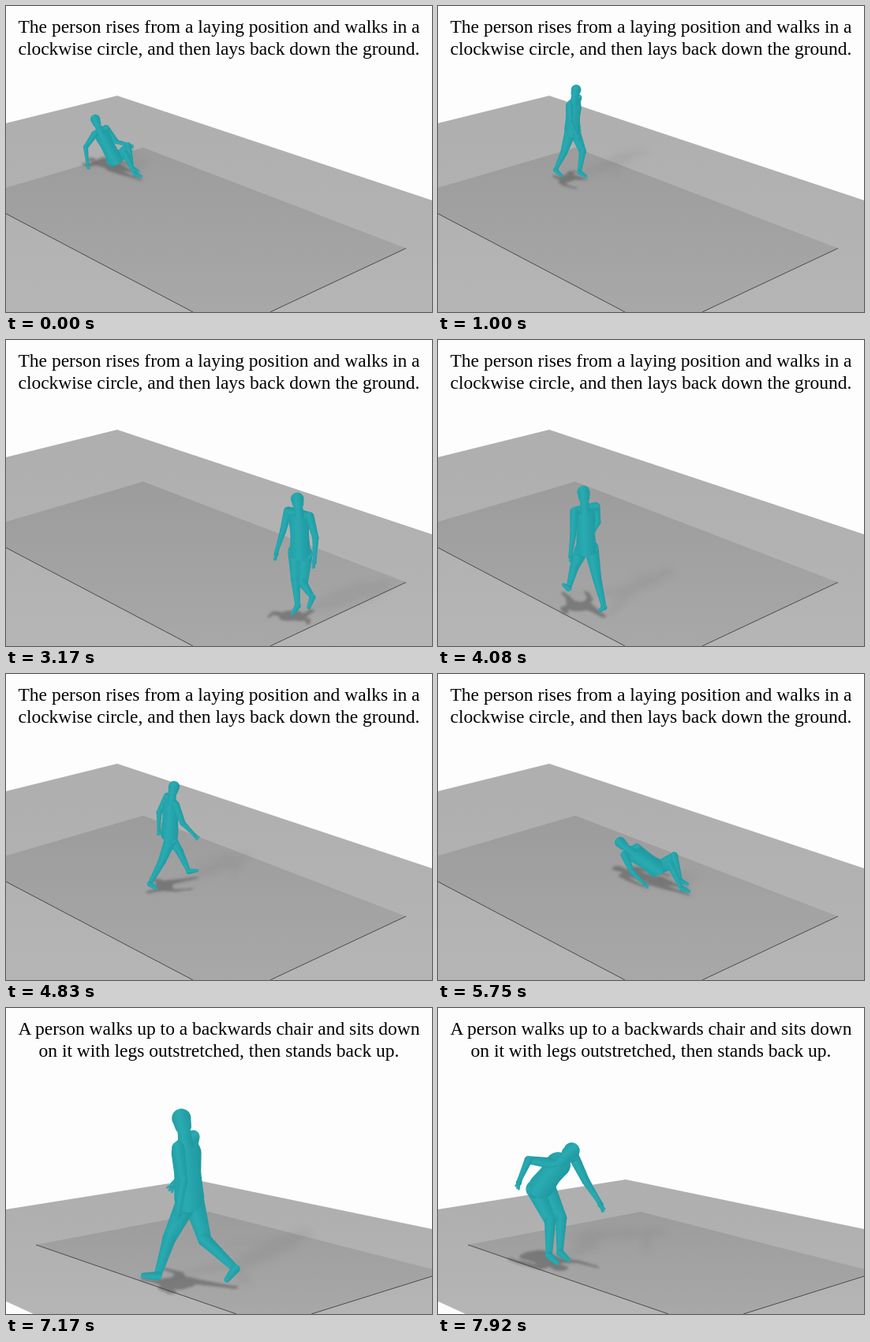
Recreate the animation shown at these times as an HTML page with a canvas. Size 540x389 px, loop 8000 ms.

```html
<!DOCTYPE html>
<html lang="en">
<head>
<meta charset="utf-8">
<title>Walking figure</title>
<style>
  html, body { margin: 0; width: 100%; height: 100%; overflow: hidden; background: #fdfdfd; }
  canvas { position: absolute; left: 0; top: 0; }
  #caption {
    position: absolute; left: 0; top: 12px; width: 540px;
    font: 23.5px/28px "Liberation Serif", "Times New Roman", serif;
    color: #000; text-align: center; white-space: pre;
  }
</style>
</head>
<body>
<canvas id="stage" width="540" height="389"></canvas>
<div id="caption"></div>
<script>
const ctx = document.getElementById('stage').getContext('2d');
const caption = document.getElementById('caption');
const LOOP = 8000, FPS = 12, CUT = 6000;
const STRIDE = 750, STEP_AT = 1833; // two steps; left foot furthest forward
const RAD = Math.PI / 180;

const mix = (a, b, u) => a + (b - a) * u;
const clamp = u => Math.min(1, Math.max(0, u));
const smooth = u => { u = clamp(u); return u * u * (3 - 2 * u); };
const segment = (rows, t) => Math.max(1, rows.findIndex(r => r[0] > t));

// Poses in degrees: lean, then [left, right] thighs, knees, arms, elbows.
const pose = (lean, thighs, knees, arms, elbows) => [lean, ...thighs, ...knees, ...arms, ...elbows];
const SIT = pose(-40, [140, 125], [125, 87], [40, -30], [50, 45]);
const LIE = pose(-80, [130, 115], [110, 80], [65, 60], [15, 15]);
const STOOP = pose(42, [42, 42], [45, 45], [25, -85], [20, 61]);

function gait(t, amp) {
  const left = Math.PI / 2 + (t - STEP_AT) / STRIDE * 2 * Math.PI;
  const both = rule => [rule(left), rule(left + Math.PI)];
  return pose(4 * amp,
    both(p => amp * (29 * Math.sin(p) + 4)),
    both(p => amp * (8 + 44 * Math.max(0, Math.cos(p)))),
    both(p => -amp * 20 * Math.sin(p) - 2),
    both(() => 8 + 16 * amp));
}
const still = p => () => p;

// Path rows are time, x, y on the ground; cues say which pose holds when.
const scenes = [{
  lines: 'The person rises from a laying position and walks in a\nclockwise circle, and then lays back down the ground.',
  path: [
    [0, 138, 204], [500, 140, 206], [920, 163, 216], [1833, 285, 239], [2600, 398, 293], [3167, 373, 349],
    [3700, 270, 372], [4083, 188, 338], [4420, 162, 300], [4833, 207, 268], [5300, 272, 262], [6000, 278, 262]
  ],
  cues: [[0, still(SIT)], [800, gait], [4950, gait], [5450, still(SIT)], [5830, still(LIE)], [6000, still(LIE)]],
  facing: 40, tilt: .45,
  size: y => 126 + .28 * (y - 239),
  floor: [[0, 149], [141, 114], [540, 247], [540, 389], [0, 389]],
  mat: [[174, 180], [0, 231], [0, 264], [237, 389], [335, 389], [507, 308]]
}, {
  lines: 'A person walks up to a backwards chair and sits down\non it with legs outstretched, then stands back up.',
  path: [[6000, 383, 370], [6640, 383, 370], [7500, 145, 330], [7917, 130, 313], [8000, 130, 313]],
  cues: [[6000, gait], [7480, gait], [7917, still(STOOP)], [8000, still(STOOP)]],
  facing: 32, tilt: .35,
  size: y => 193 + (y - 313),
  floor: [[0, 256], [238, 218], [540, 281], [540, 389], [35, 389], [0, 373]],
  mat: [[257, 259], [38, 301], [38, 301], [292, 389], [387, 389], [540, 341], [540, 332]]
}];

// Smooth point on a path; tangents vanish where a coordinate turns around.
function along(path, t) {
  const i = segment(path, t), d = path[i][0] - path[i - 1][0];
  const u = clamp((t - path[i - 1][0]) / d);
  const slope = (j, k) => (path[j + 1][k] - path[j][k]) / (path[j + 1][0] - path[j][0]);
  const tangent = (j, k) => {
    if (j === 0 || j === path.length - 1) return 0;
    const p = slope(j - 1, k), q = slope(j, k);
    return p * q > 0 ? 2 * p * q / (p + q) : 0;
  };
  return [1, 2].map(k => mix(path[i - 1][k], path[i][k], smooth(u)) +
    d * u * (1 - u) * (tangent(i - 1, k) * (1 - u) - tangent(i, k) * u));
}

// Heading and gait strength follow from the speed over the ground.
function motion(scene, t) {
  const dt = 40, [x, y] = along(scene.path, t);
  const a = along(scene.path, t - dt), b = along(scene.path, t + dt);
  const dx = b[0] - a[0], dy = (b[1] - a[1]) / scene.tilt;
  const size = scene.size(y);
  const amp = clamp(Math.hypot(dx, dy) / (2 * dt) * 1000 / (.7 * size));
  const turn = Math.atan2(dy, dx) / RAD - scene.facing;
  const wrapped = ((turn + 90) % 360 + 360) % 360 - 90;
  return { x, y, size, amp, heading: (scene.facing + amp * wrapped) * RAD };
}

function poseAt(cues, t, amp) {
  const i = segment(cues, t), [t0, a] = cues[i - 1], [t1, b] = cues[i];
  const to = b(t, amp), u = smooth((t - t0) / (t1 - t0));
  return a(t, amp).map((v, k) => mix(v, to[k], u));
}

// Bones as [start, end, start radius, end radius], in units of body height, far to near.
function skeleton(angles, heading) {
  const [lean, ...limbs] = angles.map(a => a * RAD);
  const ca = Math.cos(heading), sa = Math.sin(heading);
  const put = ([f, z], l) => [f * ca + l * sa, f * sa - l * ca, z];
  const swing = ([f, z], a, len) => [f + len * Math.sin(a), z - len * Math.cos(a)];

  const legFrom = (hip, side) => {
    const thigh = limbs[side], shin = thigh - limbs[2 + side];
    const knee = swing(hip, thigh, .23), ankle = swing(knee, shin, .23);
    const foot = Math.PI / 2 - .25 + shin * (shin < 0 ? .7 : .4);
    return [hip, knee, ankle, swing(ankle, foot, .085)];
  };
  const lowest = [0, 1].flatMap(side => {
    const [, , ankle, toe] = legFrom([0, 0], side);
    return [ankle[1] - .025, toe[1] - .015];
  });
  const hip = [0, -Math.min(-.075, ...lowest)];
  const spine = len => swing(hip, Math.PI - lean, len);

  const leg = side => {
    const l = side ? -.047 : .047;
    const [top, knee, ankle, toe] = legFrom(hip, side).map(p => put(p, l));
    return [[top, knee, .06, .038], [knee, ankle, .037, .021], [ankle, toe, .025, .016]];
  };
  const arm = side => {
    const s = side ? -1 : 1, upper = limbs[4 + side], fore = upper + limbs[6 + side];
    const shoulder = spine(.325), elbow = swing(shoulder, upper, .17), wrist = swing(elbow, fore, .15);
    const palm = swing(wrist, fore, .03);
    const fingers = [-1, 0, 1].map(k =>
      [put(palm, s * .165), put(swing(palm, fore + k * .4, .045), s * .165), .011, .006]);
    return [
      [put(shoulder, s * .1), put(elbow, s * .145), .036, .026],
      [put(elbow, s * .145), put(wrist, s * .165), .026, .016],
      [put(wrist, s * .165), put(palm, s * .165), .016, .019], ...fingers
    ];
  };
  const at = (len, l = 0) => put(spine(len), l);
  const skull = len => put(swing(spine(.36), Math.PI - lean - 10 * RAD, len), 0);
  const trunk = [
    [at(0, .04), at(0, -.04), .06, .06],
    [at(.02), at(.15), .083, .074], [at(.15), at(.265), .074, .083],
    [at(.335), at(.325, .09), .03, .036], [at(.335), at(.325, -.09), .03, .036],
    [at(.31), skull(.05), .042, .033], [skull(.055), skull(.098), .046, .053]
  ];
  const near = ca > 0 ? 1 : 0, far = 1 - near;
  return [...arm(far), ...leg(far), ...leg(near), ...trunk, ...arm(near)];
}

function capsule(a, b, ra, rb) {
  const q = Math.atan2(b[1] - a[1], b[0] - a[0]), path = new Path2D();
  path.arc(...a, ra, q + Math.PI / 2, q + Math.PI * 1.5);
  path.arc(...b, rb, q - Math.PI / 2, q + Math.PI / 2);
  path.closePath();
  for (const [p, r] of [[a, ra], [b, rb]]) {
    path.moveTo(p[0] + r, p[1]);
    path.arc(...p, r, 0, 2 * Math.PI);
  }
  return path;
}

function drawBody(bones, { x, y, size }, tilt) {
  const place = ([px, py, pz]) => [x + px * size, y + (py * tilt - pz) * size];
  for (const [p, q, rp, rq] of bones) {
    const a = place(p), b = place(q), r = Math.max(rp, rq) * size;
    const angle = Math.atan2(b[1] - a[1], b[0] - a[0]);
    let nx = -Math.sin(angle) * r, ny = Math.cos(angle) * r;
    if (nx > 0) { nx = -nx; ny = -ny; }
    const skin = ctx.createLinearGradient(a[0] + nx, a[1] + ny, a[0] - nx, a[1] - ny);
    skin.addColorStop(0, '#21a0a7');
    skin.addColorStop(.4, '#2aabb1');
    skin.addColorStop(1, '#1f98a0');
    ctx.fillStyle = skin;
    ctx.fill(capsule(a, b, rp * size, rq * size));
  }
}

// The body thrown onto the ground: each unit of height moves a point by (lean, -rise).
function drawShadow(bones, { x, y, size }, tilt, lean, rise, blur, alpha) {
  const shape = new Path2D();
  const place = ([px, py, pz]) => [(px + pz * lean) * size, (py - pz * rise / tilt) * size];
  for (const [p, q, rp, rq] of bones) shape.addPath(capsule(place(p), place(q), rp * size, rq * size));
  ctx.save();
  ctx.filter = `blur(${blur}px)`;
  ctx.translate(x, y + 1);
  ctx.scale(1, tilt);
  ctx.fillStyle = `rgba(60,60,60,${alpha})`;
  ctx.fill(shape);
  ctx.restore();
}

function fade(points, from, to) {
  const g = ctx.createLinearGradient(0, points[0][1], 0, 389);
  g.addColorStop(0, from);
  g.addColorStop(1, to);
  ctx.fillStyle = g;
  ctx.beginPath();
  for (const p of points) ctx.lineTo(...p);
  ctx.fill();
}

function drawFloor({ floor, mat }) {
  ctx.fillStyle = '#fdfdfd';
  ctx.fillRect(0, 0, 540, 389);
  fade(floor, '#b0afaf', '#b6b5b5');
  fade(mat, '#9d9c9c', '#a9a8a8');
  // The two front edges of the mat.
  ctx.strokeStyle = '#4a4a4a';
  ctx.beginPath();
  for (const i of [2, 4]) {
    ctx.moveTo(...mat[i]);
    ctx.lineTo(...mat[i + 1]);
  }
  ctx.stroke();
}

function drawScene(scene, t) {
  const body = motion(scene, t);
  const bones = skeleton(poseAt(scene.cues, t, body.amp), body.heading);
  if (caption.textContent !== scene.lines) caption.textContent = scene.lines;
  drawFloor(scene);
  drawShadow(bones, body, scene.tilt, .75, .3, 4, .07);
  drawShadow(bones, body, scene.tilt, -.1, 0, 1.5, .4);
  drawBody(bones, body, scene.tilt);
}

const start = performance.now();
let shown = -1;
function draw(now) {
  const t = Math.max(0, now - start) % LOOP;
  const step = Math.floor((t + 4) * FPS / 1000) % (LOOP * FPS / 1000);
  if (step !== shown) {
    shown = step;
    const time = step * 1000 / FPS;
    drawScene(scenes[time < CUT ? 0 : 1], time);
  }
  requestAnimationFrame(draw);
}
requestAnimationFrame(draw);
</script>
</body>
</html>
```
